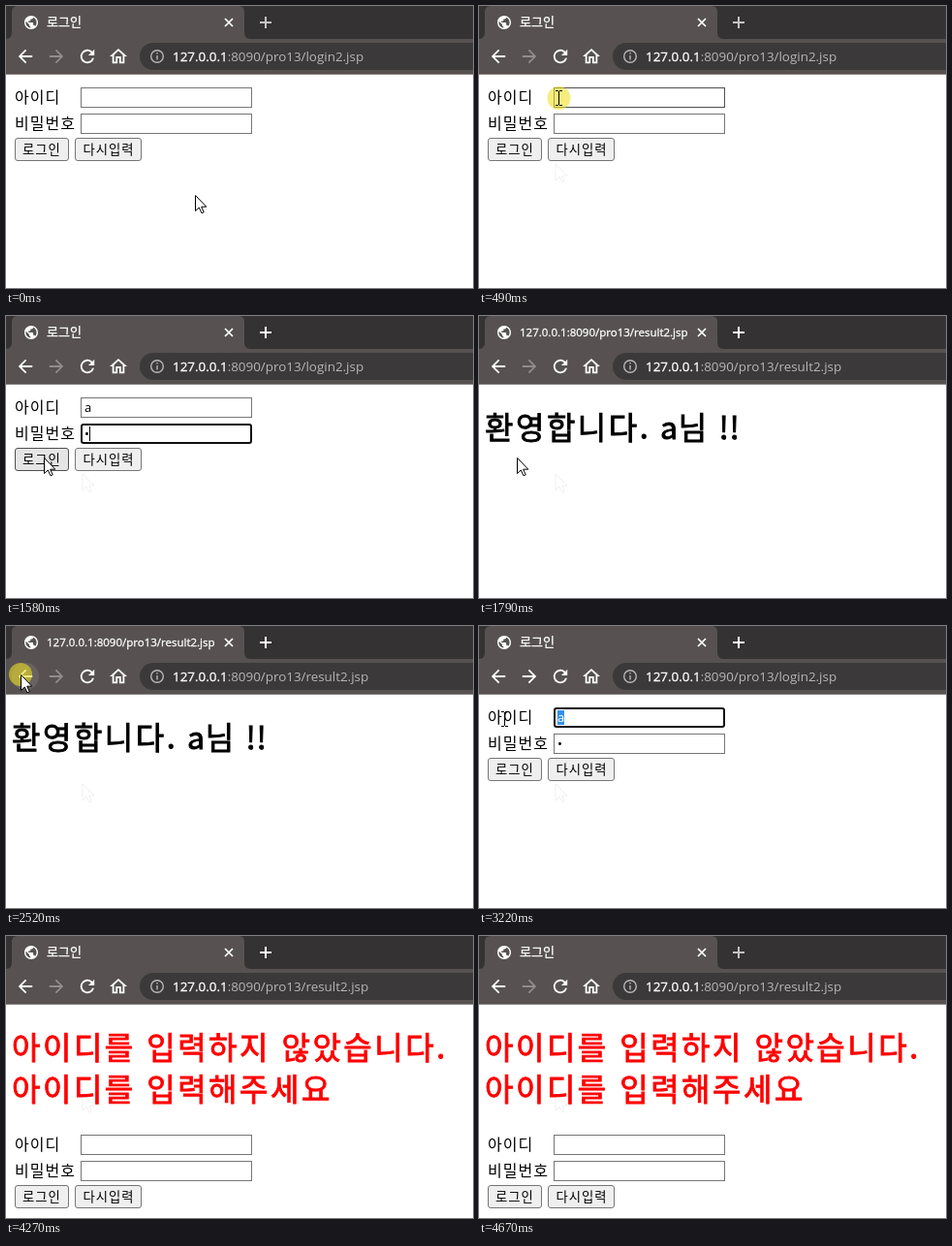
These frames come from a looping animation (482x291 px, 4.75 s). An HTML page:

```html
<!DOCTYPE html>
<html lang="ko">
<head>
<meta charset="utf-8">
<title>로그인</title>
<style>
  html, body { margin: 0; width: 100%; height: 100%; overflow: hidden; background: #fff; }
  svg { display: block; font-family: "Noto Sans CJK KR", "Noto Sans CJK", sans-serif; }
  .latin { font-family: "Open Sans", "Noto Sans", sans-serif; }
  .icon { fill: #fff; }
  .line { fill: none; stroke: #fff; stroke-width: 2; }
  .bright { fill: #fff; stroke: #fff; stroke-width: .3; }
  .label { font-size: 16px; font-weight: 300; letter-spacing: 1px; }
  .button { font-size: 13.33px; font-weight: 300; letter-spacing: 1px; text-anchor: middle; }
  .button rect { fill: #efefef; stroke: #767676; }
  .button.hover rect { fill: #e5e5e5; stroke: #4f4f4f; }
  .value { font-size: 13px; }
  .big { font-size: 32px; letter-spacing: 2.5px; stroke: #000; stroke-width: .9; }
  .big .latin { font-family: inherit; letter-spacing: .8px; }
  #error { fill: #f00; stroke: #f00; }
</style>
</head>
<body>
<svg width="482" height="291" viewBox="0 0 482 291">
  <rect width="482" height="71" fill="#353233"/>
  <path d="M0 34Q6 34 6 27V6Q6 0 12 0H240Q246 0 246 6V27Q246 34 252 34H482V70H0Z" fill="#575251"/>
  <rect y="70" width="482" height="1" fill="#8a8686"/>
  <rect x="138" y="38" width="380" height="28" rx="14" fill="#3c393a"/>

  <path class="icon" transform="translate(17.600 8.600) scale(.7)" d="M12 2C6.480 2 2 6.480 2 12s4.480 10 10 10 10-4.480 10-10S17.520 2 12 2zm-1 17.900c-4-.5-7-3.900-7-7.900 0-.6.1-1.200.2-1.800L9 15v1c0 1.100.9 2 2 2zm6.900-2.500c-.3-.8-1-1.400-1.900-1.400h-1v-3c0-.5-.5-1-1-1H8v-2h2c.5 0 1-.5 1-1V7h2c1.100 0 2-.9 2-2v-.4c2.900 1.200 5 4 5 7.400 0 2-.8 4-2.100 5.400z"/>
  <text id="tab" x="42" y="21"></text>
  <path class="line" d="M226 13l8 8m0-8l-8 8" style="stroke-width:1.7"/>
  <path class="line" id="plus" d="M262 17h12m-6-6v12"/>

  <defs><path id="arrowIcon" d="M8 -1H-4.200L1.400-6.600 0-8-8 0 0 8 1.400 6.600-4.200 1H8z"/></defs>
  <circle id="backHover" cx="20" cy="52" r="14" fill="#fff" opacity=".1"/>
  <use class="icon" href="#arrowIcon" transform="translate(20 52) scale(.9)"/>
  <use id="forward" href="#arrowIcon" transform="translate(52 52) scale(-.9 .9)"/>
  <path class="icon" transform="translate(84 52) scale(.9)" d="M5.650-5.650A8 8 0 1 0 7.730 2H5.650A6 6 0 1 1 4.220-4.220L1-1H8V-8z"/>
  <path class="icon" transform="translate(116 52) scale(.9)" d="M0-6.300L5-1.800V6H3V0H-3V6H-5V-1.800zM0-9L-10 0H-7V8H-1V2H1V8H7V0H10z"/>
  <g class="line" style="stroke:#b9b6b6;stroke-width:1.400">
    <circle cx="156" cy="52" r="6.300"/>
    <path d="M156 51v4.500M156 48v1.500"/>
  </g>
  <text class="latin" x="172" y="57" font-size="13.400" fill="#b9b6b6"><tspan class="bright">127.0.0.1</tspan>:8090/pro13/<tspan id="page"></tspan>.jsp</text>

  <text id="welcome" class="big" x="6" y="127">환영합니다.<tspan class="latin"> a</tspan>님<tspan class="latin"> !!</tspan></text>
  <g id="error" class="big">
    <text x="6" y="127">아이디를 입력하지 않았습니다.</text>
    <text x="6" y="170">아이디를 입력해주세요</text>
  </g>

  <g id="form">
    <text class="label" x="9" y="100">아이디</text>
    <text class="label" x="9" y="127">비밀번호</text>
    <g id="user" transform="translate(77 84)"></g>
    <g id="pass" transform="translate(77 111)"></g>
    <g id="login" class="button">
      <rect x="9.500" y="136.500" width="55" height="23" rx="2.500"/>
      <text x="37" y="153">로그인</text>
    </g>
    <g class="button">
      <rect x="71.500" y="136.500" width="68" height="23" rx="2.500"/>
      <text x="106" y="153">다시입력</text>
    </g>
  </g>

  <path id="trail" d="M79 163v17l4-4 3 6 2-1-2-6h5z" fill="none" stroke="#000" opacity=".06"/>
  <g id="cursor">
    <circle id="press" r="12" fill="#f0e020" opacity=".58"/>
    <path id="arrow" d="M.5 .5V16.500L4.300 13 7 18.800 9.200 17.800 6.700 12.200H11.800Z" fill="#fff" stroke="#000"/>
    <path id="beam" d="M-3.500-7.500h3m1 0h3M0-7V7M-3.500 7.500h3m1 0h3" fill="none" stroke="#000"/>
  </g>
</svg>
<script>
const LOOP = 4750, STEP = 70;
const $ = id => document.getElementById(id);
const show = (id, on) => $(id).style.display = on ? '' : 'none';
const within = (t, a, b) => t >= a && t < b;

// time, x, y of the pointer
const path = [
  [0, 195, 195], [210, 79, 163], [420, 82, 95], [630, 82, 95], [840, 108, 122],
  [1320, 108, 122], [1540, 39, 146], [2170, 39, 146], [2450, 15, 50], [2590, 15, 50],
  [2800, 95, 95], [2870, 95, 95], [3150, 26, 96], [3290, 26, 96], [3500, 95, 122],
  [3570, 95, 122], [3780, 59, 116], [3850, 59, 116], [4060, 39, 146], [LOOP, 39, 146]
];
const presses = [[490, 560], [1250, 1320], [1650, 1790], [2450, 2590], [2800, 3150], [3500, 3720], [4130, 4200]];

function pointer(t) {
  t = Math.floor(t / STEP) * STEP;
  const i = path.findIndex(p => p[0] > t);
  const [a, x, y] = path[i - 1], [b, u, v] = path[i];
  const k = (t - a) / (b - a);
  return [Math.round(x + (u - x) * k), Math.round(y + (v - y) * k)];
}

function field(id, text, focus, selected, hover) {
  const width = text === 'a' ? 7 : text ? 5 : 0;
  const border = focus
    ? '<rect x="1" y="1" width="175" height="19" rx="2" fill="#fff" stroke="#101010" stroke-width="2"/>'
    : `<rect x=".5" y=".5" width="176" height="20" fill="#fff" stroke="${hover ? '#4f4f4f' : '#767676'}"/>`;
  const mark = selected ? `<rect x="4" y="3" width="${width}" height="15" fill="#3390e8"/>` : '';
  const caret = focus && !selected ? `<rect x="${4 + width}" y="3" width="1" height="15"/>` : '';
  $(id).innerHTML = border + mark + caret +
    `<text class="value latin" x="4" y="15" fill="${selected ? '#fff' : '#000'}">${text}</text>`;
}

function draw(t) {
  const welcome = within(t, 1790, 2590), error = t >= 4270;
  const [x, y] = pointer(t);
  const over = (left, top, right, bottom) => !error && within(x, left, right) && within(y, top, bottom);

  $('tab').textContent = welcome ? '127.0.0.1:8090/pro13/result2.jsp' : '로그인';
  $('tab').setAttribute('class', welcome ? 'bright latin' : 'bright');
  $('tab').setAttribute('font-size', welcome ? 11.5 : 13);
  $('page').textContent = welcome || error ? 'result2' : 'login2';
  $('plus').style.stroke = within(t, 630, 4670) ? '#fff' : '#c4c2c2';
  $('forward').style.fill = within(t, 2590, 4270) ? '#fff' : '#918d8c';
  show('backHover', over(6, 38, 34, 66));

  show('welcome', welcome);
  show('error', error);
  show('form', !welcome);
  $('form').setAttribute('transform', `translate(0 ${error ? 121 : 0})`);
  field('user', within(t, 770, 3290) ? 'a' : '',
    within(t, 560, 1320) || within(t, 2870, 3500), within(t, 3010, 3290), over(77, 84, 254, 105));
  field('pass', within(t, 1390, 3860) ? '•' : '',
    within(t, 1320, 1790) || within(t, 3500, 4200), within(t, 3640, 3860), over(77, 111, 254, 132));
  $('login').classList.toggle('hover', over(9, 136, 65, 160));

  const text = y > 84 && y < 133;
  show('trail', t >= 280);
  show('cursor', !error);
  show('beam', text);
  show('arrow', !text);
  show('press', presses.some(p => within(t, ...p)));
  $('cursor').setAttribute('transform', `translate(${x + (text ? .5 : 0)} ${y})`);
}

const start = performance.now();
function tick() {
  draw((performance.now() - start) % LOOP);
  requestAnimationFrame(tick);
}
tick();
</script>
</body>
</html>
```
